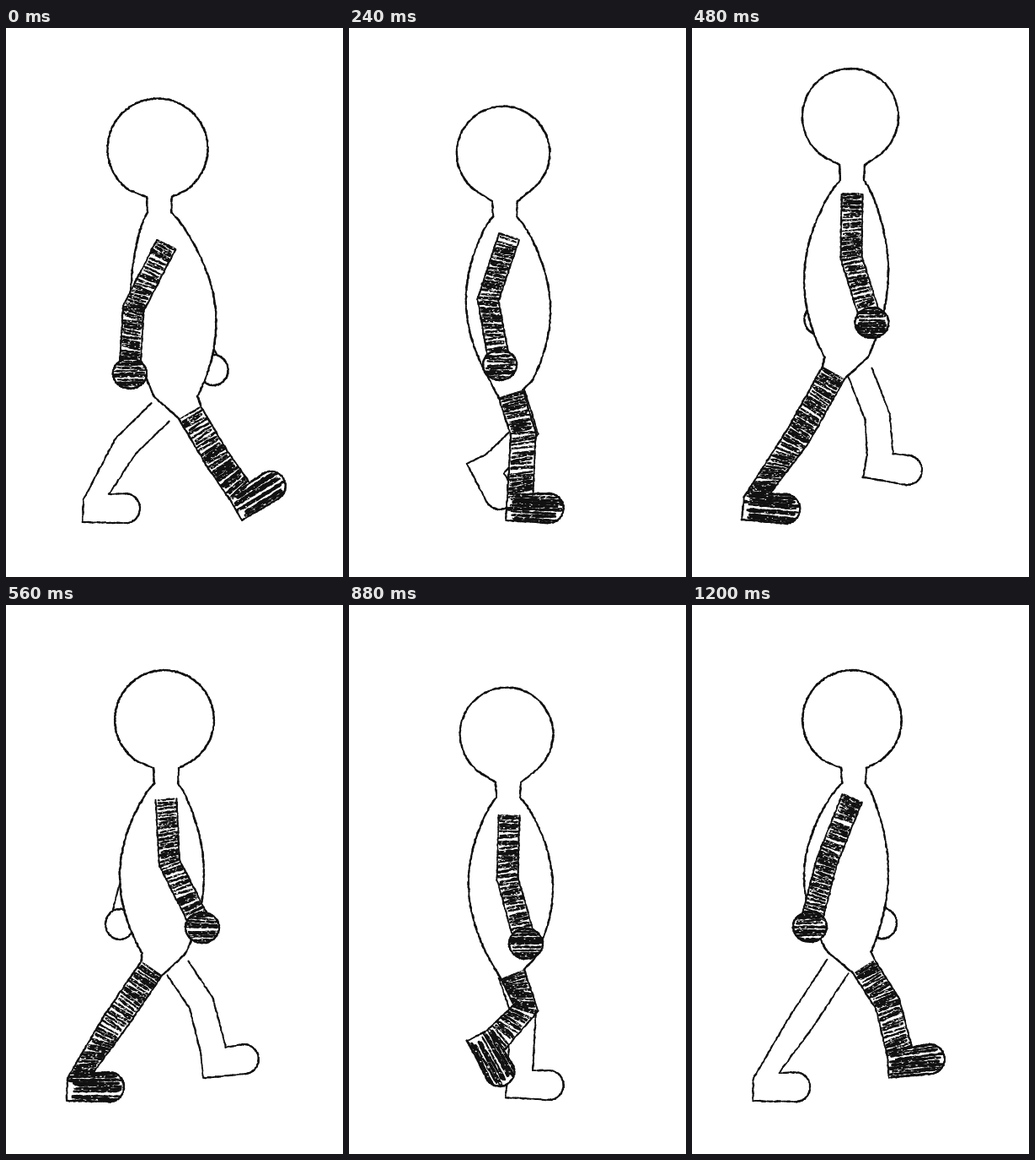
Write an HTML page with a canvas that moves like this. It is 400 px wide and 650 px high and loops after 1280 ms.

```html
<!DOCTYPE html>
<html>
<head>
<meta charset="utf-8">
<title>Walk cycle</title>
<style>
  html, body { margin: 0; height: 100%; overflow: hidden; background: #fff; }
  canvas { display: block; }
</style>
</head>
<body>
<canvas id="stage" width="400" height="650"></canvas>
<script>
const ctx = document.getElementById('stage').getContext('2d');
const STEP = 80, COUNT = 16;

// Keys: step, then values. Both legs follow one track, half a cycle apart; so do the arms.
// step, head x, head y, belly x, hip y, shoulder y
const BODY = [
  [0, 180, 143, 199, 455, 257],
  [1, 182, 155, 194, 449, 253],
  [3, 183, 148, 189, 433, 247],
  [5, 187, 122, 182, 416, 211],
  [6, 188, 105, 183, 408, 197],
  [7, 188, 136, 185, 430, 230],
  [9, 185, 157, 193, 443, 252],
  [11, 187, 153, 192, 437, 249],
  [13, 188, 122, 184, 416, 211],
  [14, 189, 107, 184, 408, 197],
  [15, 190, 136, 183, 428, 229]
];
// step, hip x, knee x, knee y, heel x, heel y, foot angle
const LEG = [
  [0, 218, 250, 509, 280, 583, -30],
  [1, 214, 240, 494, 225, 590, 0],
  [3, 192, 207, 481, 186, 583, 4],
  [5, 166, 144, 487, 105, 582, 8],
  [6, 168, 126, 483, 59, 582, 6],
  [7, 173, 130, 493, 72, 587, 2],
  [8, 183, 142, 495, 91, 585, 2],
  [9, 188, 177, 491, 100, 533, 56],
  [11, 194, 210, 477, 140, 516, 63],
  [13, 195, 208, 448, 172, 504, 26],
  [15, 204, 232, 472, 234, 560, -5]
];
// step, elbow x, palm x
const ARM = [
  [0, 151, 147], [1, 153, 140], [3, 165, 179], [5, 184, 194],
  [7, 194, 233], [9, 197, 242], [11, 188, 210], [15, 160, 140]
];

const lerp = (a, b, t) => a + (b - a) * t;
const mix = (p, q, t) => p.map((v, i) => lerp(v, q[i], t));

function track(keys, step) {
  const t = step % COUNT;
  const i = keys.findLastIndex(k => k[0] <= t);
  const a = keys[i], b = keys[(i + 1) % keys.length];
  const end = b[0] > a[0] ? b[0] : COUNT;
  return mix(a, b, (t - a[0]) / (end - a[0])).slice(1);
}

let seed = 1;
function rand(a = 0, b = 1) {
  seed = (seed * 1664525 + 1013904223) >>> 0;
  return lerp(a, b, seed / 4294967296);
}

function arc(x, y, rx, ry, from = 0, to = 360) {
  const out = [], n = Math.ceil(Math.abs(to - from) / 3);
  for (let i = 0; i <= n; i++) {
    const a = lerp(from, to, i / n) * Math.PI / 180;
    out.push([x + rx * Math.cos(a), y + ry * Math.sin(a)]);
  }
  return out;
}

// Point at distance w to the side of p, square to the line from a to b
function beside(p, a, b, w) {
  const dx = b[0] - a[0], dy = b[1] - a[1], d = Math.hypot(dx, dy);
  return [p[0] - dy / d * w, p[1] + dx / d * w];
}

function trace(pts) {
  ctx.beginPath();
  pts.forEach(p => ctx.lineTo(p[0], p[1]));
}

function blank(pts) {
  trace(pts);
  ctx.fillStyle = '#fff';
  ctx.fill();
}

// Chalky line of uneven weight
function ink(pts, weight) {
  let last = pts[0];
  for (let i = 1; i < pts.length; i++) {
    const [p, q] = [pts[i - 1], pts[i]];
    const n = Math.ceil(Math.hypot(q[0] - p[0], q[1] - p[1]) / 3);
    for (let j = 1; j <= n; j++) {
      const next = mix(p, q, j / n).map(v => v + rand(-0.4, 0.4));
      ctx.lineWidth = weight * rand(0.7, 1.3);
      trace([last, next]);
      ctx.stroke();
      last = next;
    }
  }
}

function along(pts, t) {
  const f = Math.max(0, Math.min(1, t)) * (pts.length - 1);
  const i = Math.min(pts.length - 2, Math.floor(f));
  return mix(pts[i], pts[i + 1], f - i);
}

// Scribble between two edges, with flecks of bare paper
function hatch(a, b, gap) {
  let len = 0;
  for (let i = 1; i < a.length; i++)
    for (const e of [a, b]) len += Math.hypot(e[i][0] - e[i - 1][0], e[i][1] - e[i - 1][1]) / 2;
  const n = Math.round(len / gap);
  for (let i = 0; i <= n; i++) {
    const p = along(a, (i + rand(-0.4, 0.4)) / n), q = along(b, (i + rand(-0.4, 0.4)) / n);
    ink([mix(p, q, rand(0, 0.15)), mix(p, q, rand(0.85, 1))], rand(2, 4));
    ctx.fillStyle = '#fff';
    for (let k = 0; k < 6; k++) {
      const [x, y] = mix(p, q, rand());
      ctx.fillRect(x, y + rand(-2, 2), rand(0.8, 2.2), rand(0.7, 1.3));
    }
  }
}

function shape(outline, weight, scribble) {
  blank(outline);
  if (scribble) {
    ctx.save();
    trace(outline);
    ctx.clip();
    scribble();
    ctx.restore();
  }
  ink(outline, weight);
}

function legPoints(step, hipY) {
  const [hipX, kx, ky, hx, hy, angle] = track(LEG, step);
  const hip = [hipX, hipY], knee = [kx, ky], r = angle * Math.PI / 180;
  const c = Math.cos(r), s = Math.sin(r);
  const foot = (x, y) => [hx + x * c + y * s, hy + x * s - y * c]; // from heel: forward, up
  const shin = foot(15, 31), toe = foot(50, 18);
  const edge = w => [beside(hip, hip, knee, w), beside(knee, hip, shin, w)];
  const back = [...edge(15), foot(0, 27)], front = [...edge(-15), foot(30, 34)];
  const tip = arc(toe[0], toe[1], 17.5, 17.5, angle + 90, angle - 100);
  return { hipX, back, front, foot, outline: [...back, foot(0, 0), ...tip, ...front.slice().reverse()] };
}

function drawLeg(leg, dark) {
  const { back, front, foot } = leg;
  shape(leg.outline, dark ? 2 : 1.9, dark && (() => {
    hatch(back, front, 4);
    hatch([foot(0, 32), foot(0, 0)], [foot(68, 36), foot(68, 0)], 3.8);
  }));
}

function drawArm(step, shoulderY, shift, dark) {
  const [ex, px] = track(ARM, step);
  const shoulder = [190, shoulderY], elbow = [ex + shift, shoulderY + 75];
  const palm = [px + shift, shoulderY + (dark ? 152 : 148)];
  const side = w => [
    beside(shoulder, shoulder, elbow, w),
    beside(elbow, shoulder, palm, w),
    beside(palm, elbow, palm, w)
  ];
  const a = side(12.5), b = side(-12.5);
  blank([...a, ...b.slice().reverse()]);
  if (dark) hatch(a, b, 4);
  ink(a, 1.9);
  ink(b, 1.9);

  const [x, y] = palm, rx = dark ? 20 : 17, ry = 18;
  shape(arc(x, y, rx, ry), 2, dark && (() =>
    hatch([[x - rx, y - ry], [x - rx, y + ry]], [[x + rx, y - ry], [x + rx, y + ry]], 3.6)));
}

function draw(step) {
  const [headX, headY, belly, hipY, shoulderY] = track(BODY, step);
  const near = legPoints(step, hipY), far = legPoints(step + COUNT / 2, hipY);
  const hipX = (near.hipX + far.hipX) / 2;
  seed = 977 + step * 7919;

  ctx.fillStyle = '#fff';
  ctx.fillRect(0, 0, 400, 650);
  ctx.strokeStyle = '#111';
  ctx.lineCap = ctx.lineJoin = 'round';

  drawArm(step + COUNT / 2, shoulderY, belly - 190, false);
  drawLeg(far, false);

  // Torso: a bulging profile around a spine through neck, belly and hip
  const neck = headX + 2, top = headY + 75;
  const flank = sign => {
    const out = [[neck + sign * 15, headY + 57]];
    for (let s = 0; s < 0.95; s += 0.04) {
      const spine = neck * (1 - s) * (1 - 2 * s) + belly * 4 * s * (1 - s) + hipX * s * (2 * s - 1);
      const half = 14 + 36 * Math.sin(Math.PI * s) ** 0.8;
      out.push([spine + sign * half, lerp(top, hipY, s)]);
    }
    return out;
  };
  const left = [...flank(-1), near.back[0]], right = [...flank(1), near.front[0]];
  blank([...left, ...right.slice().reverse()]);
  ink(left, 2.2);
  ink(right, 2.2);

  const r = 57 + 2.5 * Math.cos(step * Math.PI / 4);
  ink([left[0], ...arc(headX, headY, r, r, 125, 415), right[0]], 2.2);

  drawLeg(near, true);
  drawArm(step, shoulderY, 0, true);
}

let shown = -1;
function tick(now) {
  const step = Math.floor(now / STEP) % COUNT;
  if (step !== shown) draw(shown = step);
  requestAnimationFrame(tick);
}
tick(performance.now());
</script>
</body>
</html>
```
